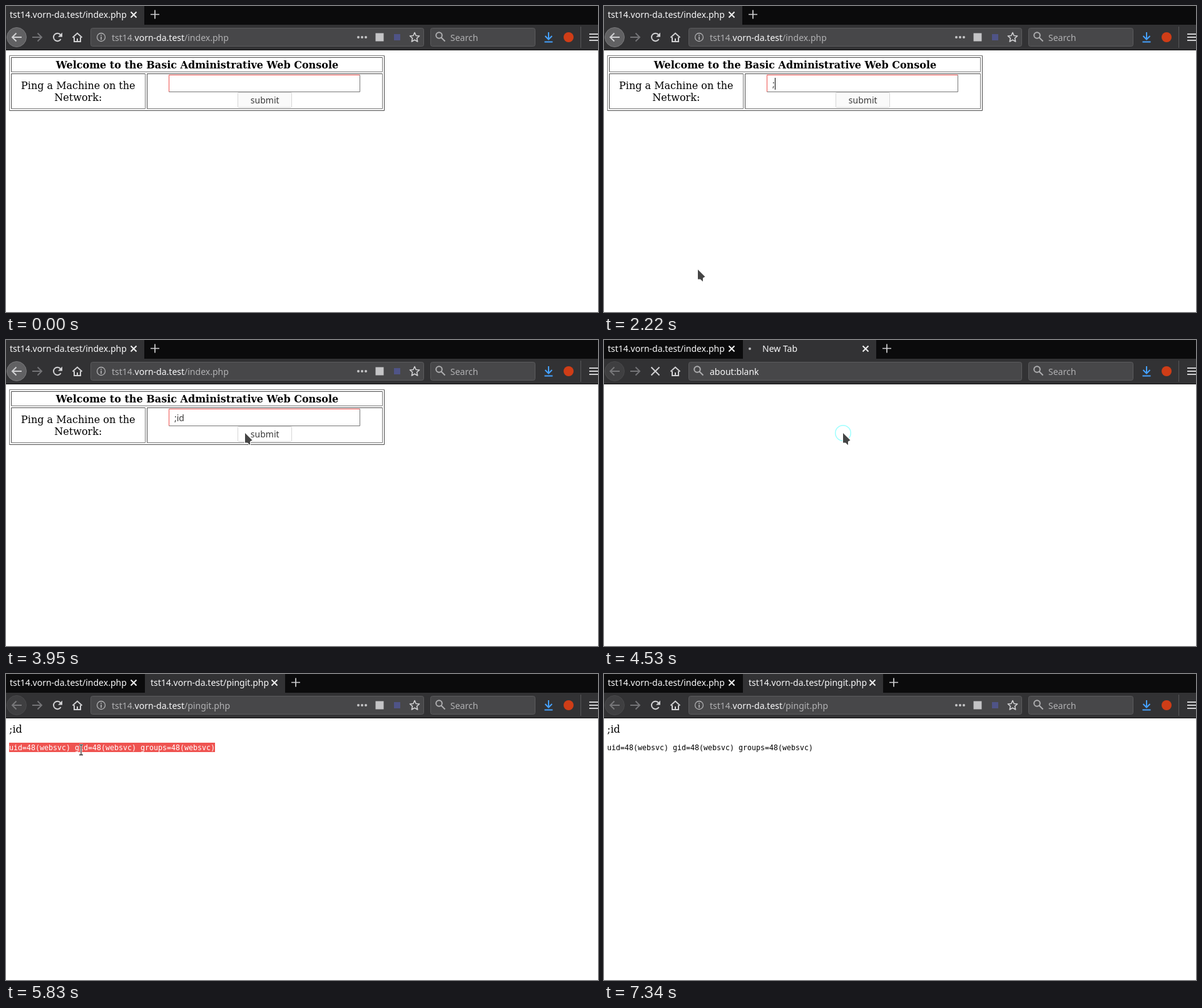
These frames come from a looping animation (946 px wide and 490 px high, 8.14 s). An HTML page:

```html
<!DOCTYPE html>
<html lang="en">
<head>
<meta charset="utf-8">
<title>Web console</title>
<style>
  html, body { margin: 0; width: 100%; height: 100%; overflow: hidden; background: #fff; }
  svg { display: block; width: 946px; height: 490px; }
  text { font: 14px "Noto Sans", sans-serif; white-space: pre; }
  .serif { font: 16px "DejaVu Serif", serif; }
  .mono { font: 11.63px "DejaVu Sans Mono", monospace; }
  .bold { font-weight: bold; }
  .mid { text-anchor: middle; }
  .light { fill: #f9f9fa; }
  .dim { fill: #b1b1b3; }
  .line { fill: none; stroke: #d0d0d2; stroke-width: 2; }
  .faint { stroke: #737376; }
  .field { fill: #474749; stroke: #5b5b5d; }
  #back circle { fill: #616163; stroke: #78787a; }
  #back.off circle { fill: #3f3f41; stroke: #49494b; }
  #back.off path { stroke: #77777a; }
</style>
</head>
<body>
<svg viewBox="0 0 946 490">
  <defs>
    <path id="cross" class="line" d="M-4.5-4.5l9 9m0-9l-9 9" style="stroke:#f0f0f0"/>
    <g id="lens" class="line"><circle cx="-2" cy="-2" r="4.8"/><path d="M1.5 1.5L7.5 7.5"/></g>
  </defs>

  <!-- form page -->
  <g id="form">
    <g id="cells" fill="none"></g>
    <text class="serif bold mid" x="305.5" y="100">Welcome to the Basic Administrative Web Console</text>
    <text class="serif mid" x="115.3" y="133">Ping a Machine on the</text>
    <text class="serif mid" x="115.3" y="152">Network:</text>
    <text id="typed" x="269" y="130" fill="#3c3c3c"></text>
    <rect id="caret" y="115" width="1" height="19"/>
    <rect id="button" x="370.5" y="138.5" width="86" height="24" rx="1" stroke="#d6d6d6"/>
    <text class="mid" x="413.7" y="156" fill="#3a3a3a">submit</text>
  </g>

  <!-- answer page -->
  <g id="answer">
    <text class="serif" x="5" y="94">;id</text>
    <rect id="mark" x="5" y="110" width="329" height="15" fill="#ef5350"/>
    <text id="ids" class="mono" x="5" y="122">uid=48(websvc) gid=48(websvc) groups=48(websvc)</text>
  </g>

  <!-- tabs -->
  <rect width="946" height="30" fill="#0b0b0c"/>
  <rect id="active" height="30" fill="#323234"/>
  <text class="light" x="6" y="19">tst14.vorn-da.test/index.php</text>
  <use href="#cross" x="204" y="14"/>
  <g id="fresh">
    <circle id="dot" cx="233" cy="14" r="2" fill="#b8b8ba"/>
    <text class="light" x="253" y="19">New Tab</text>
  </g>
  <text id="title" class="light" x="231" y="19">tst14.vorn-da.test/pingit.php</text>
  <use id="close" href="#cross" y="14"/>
  <path id="plus" class="line" d="M-7 13.5H7M0 6.5v14" style="stroke-width:1.7"/>

  <!-- toolbar -->
  <rect y="30" width="946" height="40" fill="#323234"/>
  <rect y="70" width="946" height="1" fill="#0c0c0d"/>
  <g id="back">
    <circle cx="17" cy="50" r="15.5"/>
    <path class="line" d="M25 50H10M16.5 43.5L10 50l6.5 6.5"/>
  </g>
  <path class="line faint" d="M42 50H57M50.5 43.5L57 50l-6.5 6.5"/>
  <g id="reload">
    <path class="line" d="M87 46A6.2 6.2 0 1 0 87.6 53"/>
    <path d="M90 42.500v7h-7z" fill="#d0d0d2"/>
  </g>
  <path id="stop" class="line" d="M75.500 43.500l13 13m0-13l-13 13"/>
  <path class="line" d="M106.500 50.500L114 43.500l7.500 7M109 50v7h10v-7M114 57v-5"/>

  <rect class="field" x="135.500" y="35.500" width="532" height="29" rx="3"/>
  <g id="place">
    <circle class="line" cx="152" cy="50" r="6.500" style="stroke-width:1.300;stroke:#b1b1b3"/>
    <path d="M151.200 46h1.700v1.800h-1.700zM151.200 49h1.700v5h-1.700z" fill="#b1b1b3"/>
    <text class="dim" x="169" y="56">tst14.<tspan class="light">vorn-da.test</tspan><tspan id="path"></tspan></text>
    <g fill="#c4c4c6">
      <circle cx="563" cy="50" r="2"/><circle cx="569" cy="50" r="2"/><circle cx="575" cy="50" r="2"/>
      <rect x="590.500" y="43.500" width="13" height="13"/>
    </g>
    <rect x="620" y="45" width="10" height="10" fill="#4f5487"/>
    <path id="star" class="line" style="stroke-width:1.600;stroke-linejoin:round"/>
  </g>
  <g id="blank">
    <use href="#lens" x="151" y="49" opacity=".75"/>
    <text class="light" x="169" y="56">about:blank</text>
  </g>
  <rect class="field" x="678.500" y="35.500" width="167" height="29" rx="3"/>
  <use href="#lens" x="694" y="49" opacity=".75"/>
  <text class="dim" x="710" y="56">Search</text>
  <path class="line" d="M867 42v11M861.500 48l5.500 5.500 5.500-5.500M860.500 57.500h13" style="stroke:#45a1ff"/>
  <circle cx="899" cy="50" r="8" fill="#cf3d17"/>
  <rect x="918" y="33" width="1" height="34" fill="#58585a"/>
  <path class="line" d="M932 45h14M932 50h14M932 55h14"/>

  <!-- pointer -->
  <circle id="ring" r="12.300" fill="none" stroke="#5fffff" stroke-width="1.500"/>
  <g id="arrow" stroke-linejoin="round">
    <path d="M0 0V15.500H4L8 19.300V13.500L11.500 11.500Z" fill="#454545" stroke="#fff" stroke-width="2" paint-order="stroke"/>
  </g>
  <g id="beam" fill="none">
    <path d="M-3-8H3M0-8V8M-3 8H3" stroke="#fff" stroke-width="3"/>
    <path d="M-3-8H3M0-8V8M-3 8H3" stroke="#333" stroke-width="1.300"/>
  </g>
</svg>
<script>
const LOOP = 8140;
const $ = id => document.getElementById(id);
const set = (id, attrs) => { for (const k in attrs) $(id).setAttribute(k, attrs[k]); };
const show = (id, on) => { $(id).style.display = on ? "" : "none"; };
const within = (v, a, b) => v >= a && v < b;

// Bordered box: one colour on top and left, another on bottom and right
function bevel(x, y, w, h, lit, shade) {
  x += .5; y += .5; w--; h--;
  $("cells").innerHTML +=
    `<path d="M${x} ${y + h}v${-h}h${w}" stroke="${lit}"/>` +
    `<path d="M${x} ${y + h}h${w}v${-h}" stroke="${shade}"/>`;
}
bevel(5, 79, 600, 89, "#777", "#4a4a4a");
bevel(8, 82, 594, 24, "#4a4a4a", "#777");
bevel(8, 108, 215, 57, "#4a4a4a", "#777");
bevel(225, 108, 377, 57, "#4a4a4a", "#777");
bevel(260, 110, 306, 28, "#ef5350", "#777");

const spikes = Array.from({ length: 10 }, (_, i) => {
  const r = i % 2 ? 3.7 : 8, a = i * Math.PI / 5;
  return [653 + r * Math.sin(a), 50.5 - r * Math.cos(a)].map(v => v.toFixed(1));
});
set("star", { d: "M" + spikes.join("L") + "Z" });

// Pointer stops: time, x, y, and 1 for a steady run up to that stop
const stops = [
  [110, 304, 134], [430, 304, 117.5], [1890, 304, 117.5], [2220, 150, 422],
  [3420, 150, 422], [3950, 382, 149], [4740, 382, 149], [4930, 290, 265, 1],
  [5080, 208, 170, 1], [5320, 120, 121.5, 1], [5840, 120, 121.5], [6240, 200, 220],
  [6690, 200, 220], [6990, 451, 174], [7110, 451, 174], [7340, 651, 283]
];

function pointer(t) {
  const i = stops.findIndex(s => s[0] > t);
  if (i < 1) return null;
  const a = stops[i - 1], b = stops[i];
  const u = (t - a[0]) / (b[0] - a[0]);
  const k = b[3] ? u : u * u * (3 - 2 * u);
  return [a[1] + (b[1] - a[1]) * k, a[2] + (b[2] - a[2]) * k];
}

function drawForm(t) {
  $("typed").textContent = ";id".slice(0, (t >= 2060) + (t >= 2760) + (t >= 2900));
  const end = t < 2060 ? 0 : $("typed").getComputedTextLength();
  set("caret", { x: Math.round(269 + end) });
  show("caret", within(t, 430, 1580) || within(t, 2060, 3460));
  set("button", { fill: t >= 4200 ? "#eee" : t >= 3870 ? "#fff" : "#fafafa" });
}

function drawBrowser(t, opened, loaded) {
  const grow = Math.min(1, Math.max(0, (t - 4250) / 280));
  const end = loaded ? 446 : opened ? 222 + 213 * (1 - (1 - grow) ** 2) : 221;
  const start = opened ? 222 : 0;
  set("active", { x: start, width: end - start });
  set("close", { x: end - 17 });
  set("plus", { transform: `translate(${end + 17} 0)` });
  show("close", loaded || t >= 4530);
  show("fresh", opened && !loaded && end > 320);
  show("dot", t >= 4530);
  show("title", loaded);
  show("place", !opened || loaded);
  show("blank", opened && !loaded);
  const loading = within(t, 4530, 4710);
  show("stop", loading);
  show("reload", !loading);
  $("back").classList.toggle("off", opened);
  $("path").textContent = loaded ? "/pingit.php" : "/index.php";
}

function drawPointer(t, opened, loaded) {
  const p = pointer(t);
  let text = false;
  if (p) {
    const [x, y] = p;
    text = loaded ? x < 334 && within(y, 110, 126)
                  : !opened && within(x, 260, 566) && within(y, 110, 138);
    const transform = `translate(${x} ${y})`;
    for (const id of ["arrow", "beam", "ring"]) set(id, { transform });
  }
  show("arrow", p && !text);
  show("beam", p && text);
  const click = [[430, 780], [4200, 4710]].find(c => within(t, ...c));
  show("ring", click);
  if (click) set("ring", { opacity: 1 - .6 * (t - click[0]) / (click[1] - click[0]) });
}

function draw(t) {
  const opened = t >= 4250, loaded = t >= 4710;
  show("form", !opened);
  show("answer", loaded);
  if (!opened) drawForm(t);
  const selected = within(t, 5650, 6710);
  show("mark", selected);
  set("ids", { fill: selected ? "#fff" : "#000" });
  drawBrowser(t, opened, loaded);
  drawPointer(t, opened, loaded);
}

const begin = performance.now();
function tick() {
  draw((performance.now() - begin) % LOOP);
  requestAnimationFrame(tick);
}
tick();
</script>
</body>
</html>
```
